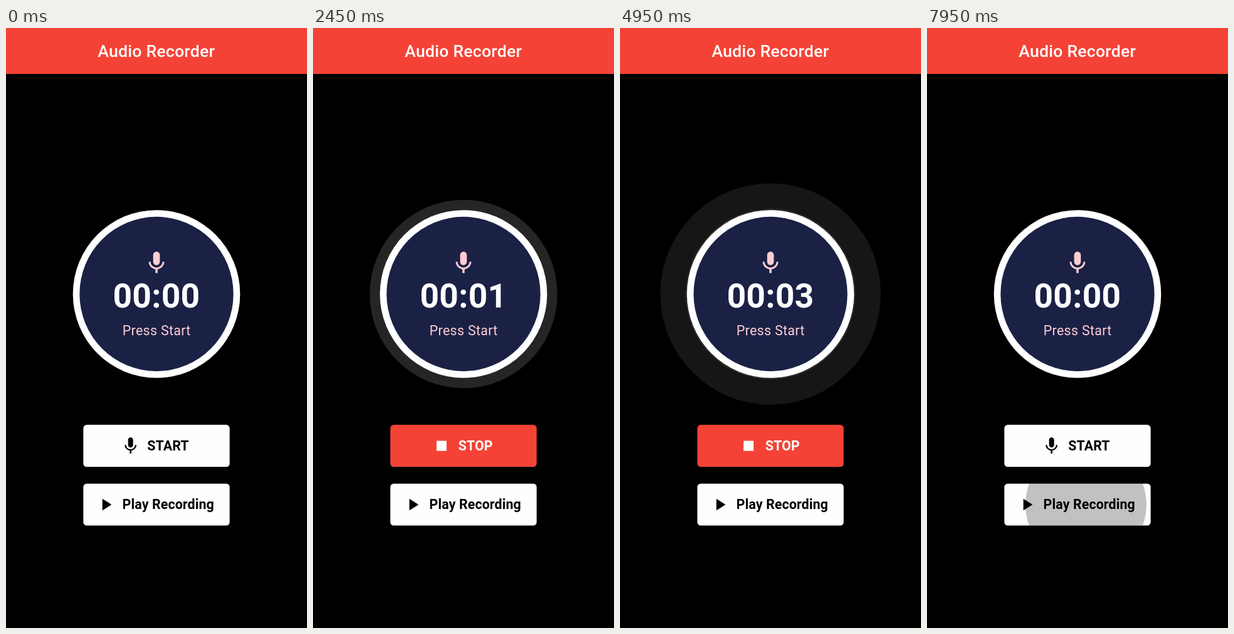
Recreate the animation shown at these times as an HTML page. Size 480 by 953 pixels, loop 8 s.

```html
<!DOCTYPE html>
<html lang="en">
<head>
<meta charset="utf-8">
<title>Audio Recorder</title>
<style>
  html, body { margin: 0; width: 100%; height: 100%; overflow: hidden; background: #000; }
  svg { display: block; width: 100%; height: 100%; }
  text { font-family: Roboto, "Noto Sans", sans-serif; white-space: pre; }
  .label { font-size: 21.333px; font-weight: 700; letter-spacing: .133px; }
  .mid { text-anchor: middle; }
</style>
</head>
<body>
<svg viewBox="0 0 480 953" xmlns="http://www.w3.org/2000/svg">
  <defs>
    <path id="mic" d="M12 14c1.66 0 2.99-1.34 2.99-3L15 5c0-1.66-1.34-3-3-3S9 3.34 9 5v6c0 1.66 1.34 3 3 3zm5.3-3c0 3-2.54 5.1-5.3 5.1S6.7 14 6.7 11H5c0 3.41 2.72 6.23 6 6.72V21h2v-3.28c3.28-.48 6-3.3 6-6.72h-1.7z"/>
    <clipPath id="topClip"><rect x="123.33" y="630.33" width="233.33" height="66.67" rx="5.33"/></clipPath>
    <clipPath id="lowClip"><rect x="123.33" y="723.67" width="233.33" height="66.67" rx="5.33"/></clipPath>
  </defs>
  <rect width="480" height="953"/>
  <rect width="480" height="73" fill="#f44336"/>
  <text class="mid" x="239.6" y="46" font-size="26.667" font-weight="500" letter-spacing=".2" fill="#fff">Audio Recorder</text>

  <circle id="bigGlow" cx="240" cy="422.5" fill="#fff"/>
  <circle id="smallGlow" cx="240" cy="422.5" fill="#fff"/>
  <circle cx="240" cy="422.5" r="133.33" fill="#fff"/>
  <circle cx="240" cy="422.5" r="122.67" fill="#1a2145"/>
  <use href="#mic" transform="translate(218.67 351.8) scale(1.7778)" fill="#ffcdd2"/>
  <text id="timer" class="mid" x="240" y="444.2" font-size="53.333" font-weight="700" letter-spacing=".333" fill="#fff">00:00</text>
  <text class="mid" x="240.2" y="487.8" font-size="21.333" letter-spacing=".333" fill="#ffcdd2">Press Start</text>

  <g clip-path="url(#topClip)">
    <rect id="topFill" x="123" y="630" width="234" height="68"/>
    <circle id="startInk" fill="#000"/>
    <circle id="stopInk" fill="#fff"/>
  </g>
  <use id="startIcon" href="#mic" transform="translate(182.67 647.67) scale(1.3333)"/>
  <rect id="stopIcon" x="197" y="655.67" width="16" height="16" fill="#fff"/>
  <text id="topLabel" class="label" y="670.9"></text>

  <g clip-path="url(#lowClip)">
    <rect x="123" y="723" width="234" height="68" fill="#fffdff"/>
    <circle id="playInk" fill="#000"/>
  </g>
  <path d="M8 5v14l11-7z" transform="translate(143 741) scale(1.3333)"/>
  <text class="label" x="185.6" y="764.3">Play Recording</text>
</svg>
<script>
const LOOP = 8000;
const REC_START = 1408, REC_STOP = 6750;
const GLOW_TIME = 2000, GLOW_EVERY = 2129, GLOW_R = 186.67;
const INK_R = 121.3, INK_ALPHA = 0.24;

const $ = id => document.getElementById(id);
const clamp = v => Math.min(1, Math.max(0, v));
const set = (id, attrs) => {
  for (const k in attrs) $(id).setAttribute(k, attrs[k]);
};

function bezier(x1, y1, x2, y2) {
  const at = (a, b, s) => 3 * a * s * (1 - s) ** 2 + 3 * b * s * s * (1 - s) + s ** 3;
  return x => {
    if (x <= 0 || x >= 1) return clamp(x);
    let lo = 0, hi = 1;
    for (let i = 0; i < 24; i++) {
      const m = (lo + hi) / 2;
      if (at(x1, x2, m) < x) lo = m; else hi = m;
    }
    return at(y1, y2, lo);
  };
}
const fastOutSlowIn = bezier(0.4, 0, 0.2, 1);
const ease = bezier(0.25, 0.1, 0.25, 1);

// Touch ripple: spreads slowly while held, finishes and fades after release.
function ink(id, t, x, cy, down, up) {
  const held = Math.min(t, up) - down;
  const p = ease(clamp(held / 1000 + Math.max(0, t - up) / 225));
  const fade = clamp((t - down) / 75) * (1 - clamp((t - up - 225) / 150));
  set(id, {
    cx: x + (240 - x) * p,
    cy,
    r: INK_R * 0.3 + (INK_R * 0.7 + 6.67) * p,
    opacity: INK_ALPHA * fade
  });
}

function glow(t) {
  const since = t - REC_START;
  const cycle = Math.min(2, Math.floor(since / GLOW_EVERY));
  const u = since < 0 ? 1 : clamp((since - cycle * GLOW_EVERY) / GLOW_TIME);
  const p = fastOutSlowIn(u);
  const opacity = 0.3 * (1 - u);
  set('bigGlow', { r: GLOW_R * p, opacity });
  set('smallGlow', { r: GLOW_R * (1 / 3 + p * 5 / 12), opacity });
}

function render(t) {
  const rec = t >= REC_START && t < REC_STOP;
  const secs = rec ? Math.floor((t - REC_START) / 1000) : 0;
  $('timer').textContent = '00:' + String(secs).padStart(2, '0');

  // The label colour crossfades while the button itself switches at once.
  const mix = rec ? clamp((t - REC_START) / 200)
    : t >= REC_STOP ? 1 - clamp((t - REC_STOP) / 200) : 0;
  const c = Math.round(255 * mix);
  $('topLabel').textContent = rec ? 'STOP' : 'START';
  set('topLabel', { x: rec ? 231.67 : 225.33, fill: `rgb(${c},${c},${c})` });
  set('topFill', { fill: rec ? '#f44336' : '#fffdff' });
  set('startIcon', { visibility: rec ? 'hidden' : 'visible' });
  set('stopIcon', { visibility: rec ? 'visible' : 'hidden' });

  glow(t);
  ink('startInk', t, 240, 663.67, 300, REC_START);
  ink('stopInk', t, 302, 663.67, 5816, REC_STOP);
  ink('playInk', t, 279, 757, 7569, LOOP);
}

const began = performance.now();
function tick() {
  render((performance.now() - began) % LOOP);
  requestAnimationFrame(tick);
}
render(0);
requestAnimationFrame(tick);
</script>
</body>
</html>
```
